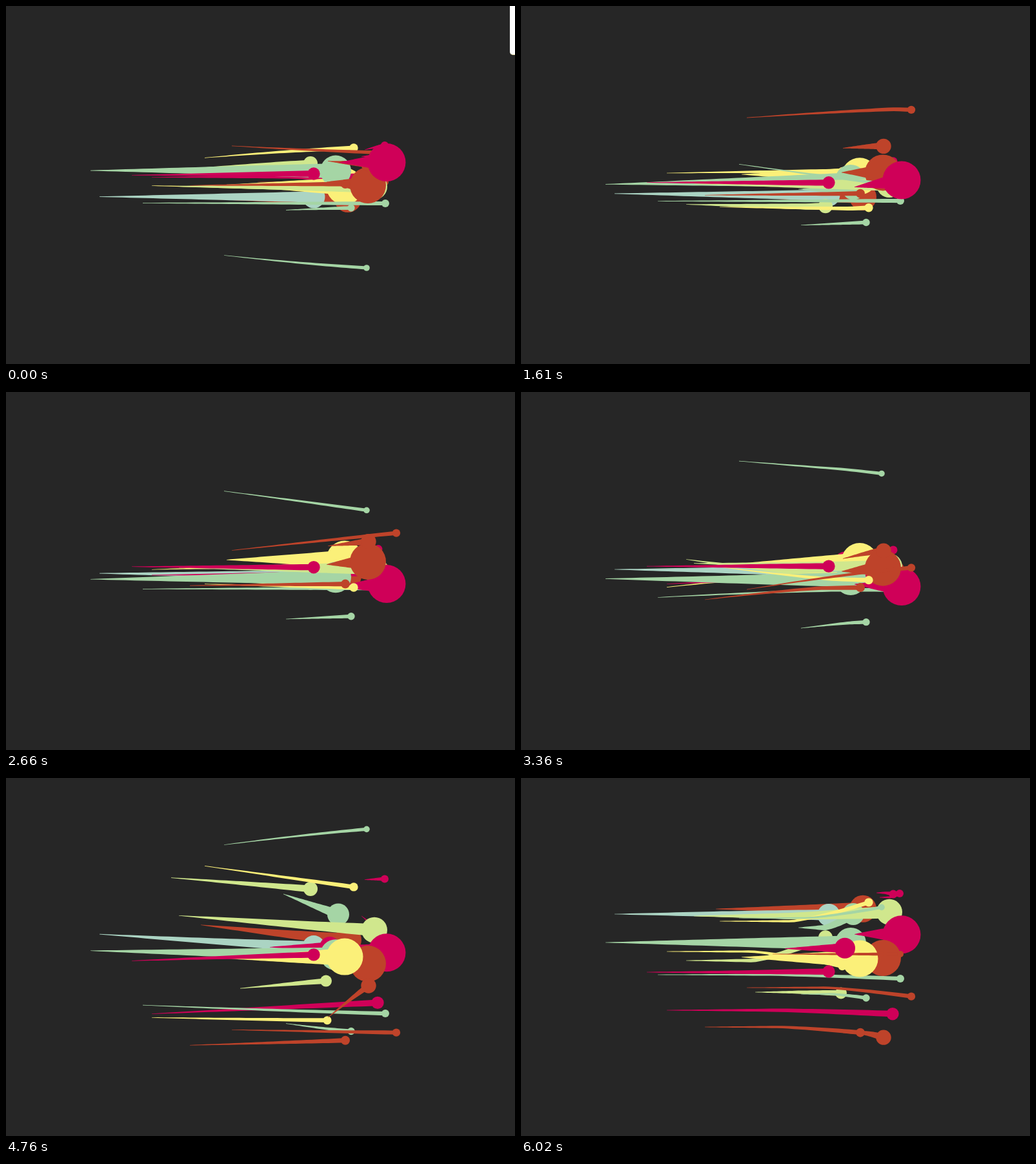
Animation, 789 px wide and 555 px high, one loop 6.09 s. Source, as an HTML page with a canvas:

```html
<!DOCTYPE html>
<html lang="en">
<head>
<meta charset="utf-8">
<title>Streaming comets</title>
<style>
html, body { margin: 0; width: 100%; height: 100%; overflow: hidden; background: #262626; }
canvas { display: block; }
#tab {
  position: absolute; left: 781px; top: -6px; width: 20px; height: 81px;
  background: #fff; border-bottom: 1px solid #e6dfa8; border-radius: 0 0 0 5px;
}
</style>
</head>
<body>
<canvas id="stage" width="789" height="555"></canvas>
<div id="tab"></div>
<script>
const ctx = document.getElementById('stage').getContext('2d');
const tab = document.getElementById('tab');
const LOOP = 6090, STEP = 70, SPAN = 350, SEGMENTS = 28;
const BEATS = [0, 1650, 3450, 4600, 5580, 6200];
const RED = '#be432a', PINK = '#cf0058', YELLOW = '#fbf079',
      GREEN = '#a5d5a5', LIME = '#d0e78d', BLUE = '#abd4c3';
const blobs = [];

// Slow swing around a middle height, lowest on screen at time peak
const sway = (mid, amp, peak) => t => mid + amp * Math.cos(2 * Math.PI * (t - peak) / LOOP);

// Wander from height to height, turning on the beats: half linear, half monotone cubic
function wander(...ys) {
  const last = BEATS.length - 1;
  const rate = i => i < 0 || i >= last ? 0 : (ys[i + 1] - ys[i]) / (BEATS[i + 1] - BEATS[i]);
  const slope = i => {
    const p = rate(i - 1), q = rate(i);
    return p * q > 0 ? 2 * p * q / (p + q) : 0;
  };
  return t => {
    if (t >= BEATS[last]) return ys[last];
    const i = BEATS.findIndex(b => b > t) - 1;
    const h = BEATS[i + 1] - BEATS[i], s = (t - BEATS[i]) / h, rise = ys[i + 1] - ys[i];
    const cubic = rise * s * s * (3 - 2 * s)
      + h * s * (1 - s) * (slope(i) * (1 - s) - slope(i + 1) * s);
    return ys[i] + (rise * s + cubic) / 2;
  };
}

// Layer that changes from a to b at a given time
const shift = (time, a, b) => t => t < time ? a : b;

function blob(color, x, r, tipX, y, layer = () => 1) {
  blobs.push({ color, x, r, tipX, y, layer });
}

blob(RED, 530, 21, 302, wander(299, 296, 275, 259, 202, 203));
blob(BLUE, 477, 17.5, 145, wander(296, 293, 277, 268, 218, 211));
blob(GREEN, 515, 17, 430, wander(258, 284, 284, 224, 147, 232));
blob(LIME, 472, 11, 256, wander(244, 311, 278, 180, 138, 283));
blob(LIME, 496, 9, 363, wander(257, 272, 287, 310, 338, 332));
blob(YELLOW, 498, 6.5, 226, wander(283, 256, 284, 377, 363, 269));
blob(RED, 588, 5, 390, sway(272, 1, 0), shift(4800, 1, 3));
blob(PINK, 502, 16, 409, sway(264, 2, 1600), shift(4800, 1, 3));
blob(YELLOW, 525, 28.5, 342, sway(270, 11, 5600), shift(3800, 1, 2));
blob(PINK, 576, 9.7, 226, wander(264, 274, 288, 341, 383, 360));
blob(GREEN, 511, 24, 131, sway(273, 18, 3300));
blob(PINK, 577, 6.5, 551, wander(232, 241, 245, 240, 188, 178));
blob(LIME, 571, 20, 268, wander(280, 277, 270, 244, 189, 214));
blob(GREEN, 588, 6, 212, wander(306, 302, 307, 369, 332, 305));
blob(PINK, 590, 29.5, 517, sway(272, 30, 3200), shift(2100, 2, 1));
blob(PINK, 587, 6, 556, wander(216, 262, 285, 156, 160, 185));
blob(RED, 561, 28, 497, sway(273, 15, 4900));
blob(RED, 562, 11.7, 499, wander(245, 217, 248, 304, 424, 395));
blob(PINK, 477, 9.7, 195, wander(260, 274, 270, 271, 296, 301), () => 3);
blob(YELLOW, 539, 6.7, 308, wander(220, 314, 290, 183, 104, 222));
blob(GREEN, 535, 5.7, 434, wander(313, 336, 358, 396, 362, 335));
blob(GREEN, 559, 4.8, 338, wander(406, 272, 120, 72, 143, 217));
blob(RED, 526, 7, 285, wander(276, 291, 304, 403, 421, 386));
blob(RED, 605, 6.2, 350, wander(228, 160, 279, 396, 382, 325));

// The tail shows where the head goes during the next SPAN ms.
function drawBlob(b, t) {
  const upper = [], lower = [];
  for (let i = 0; i <= SEGMENTS; i++) {
    const u = i / SEGMENTS;
    const x = b.x + (b.tipX - b.x) * u, y = b.y(t + u * SPAN);
    const half = b.r * 0.47 * (1 - u) + 0.3;
    upper.push([x, y - half]);
    lower.unshift([x, y + half]);
  }
  ctx.fillStyle = b.color;
  ctx.beginPath();
  upper.concat(lower).forEach(p => ctx.lineTo(...p));
  ctx.fill();
  ctx.beginPath();
  ctx.arc(b.x, b.y(t), b.r, 0, Math.PI * 2);
  ctx.fill();
}

function draw() {
  const t = Math.floor((performance.now() - start) % LOOP / STEP) * STEP;
  ctx.fillStyle = '#262626';
  ctx.fillRect(0, 0, 789, 555);
  [...blobs].sort((a, b) => a.layer(t) - b.layer(t)).forEach(b => drawBlob(b, t));
  tab.style.display = t < STEP ? 'block' : 'none';
  requestAnimationFrame(draw);
}

const start = performance.now();
draw();
</script>
</body>
</html>
```
